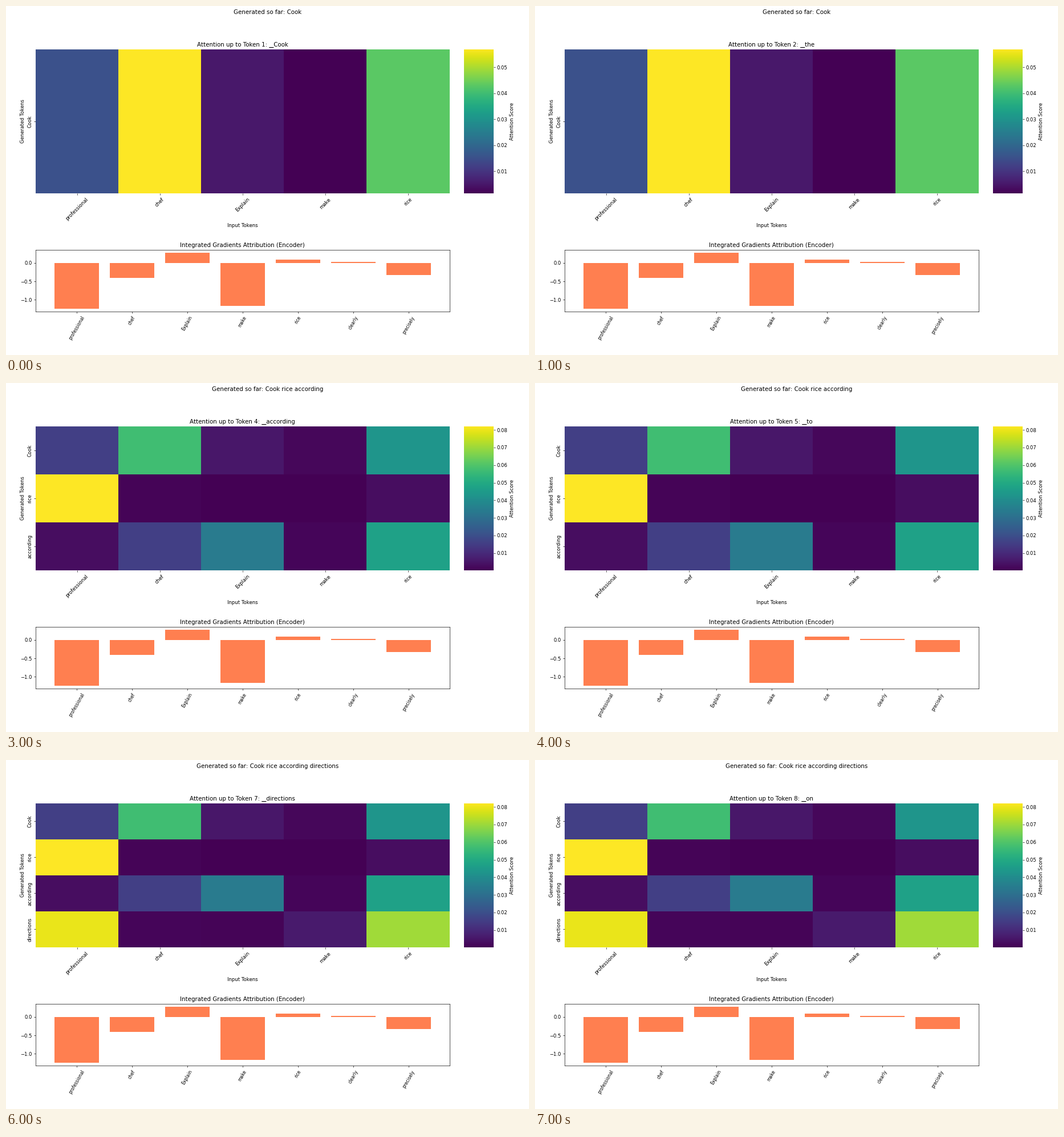
Animation, 917 px wide and 611 px high, one loop 8 s. Source, as a matplotlib script:

```python
import numpy as np
import matplotlib.pyplot as plt
from matplotlib.animation import FuncAnimation
from matplotlib.ticker import MultipleLocator

W, H = 917, 611
DPI = 61.125
plt.rcParams["font.family"] = "DejaVu Sans"

INPUTS = ["professional", "chef", "Explain", "make", "rice"]
TOKENS = ["Cook", "the", "rice", "according", "to", "the", "directions", "on"]
# Attention per content word; filler tokens add no row
SCORES = {
    "Cook": [0.0152, 0.0569, 0.0050, 0.00154, 0.0427],
    "rice": [0.0820, 0.0008, 0.00016, 0.00016, 0.0029],
    "according": [0.0029, 0.0155, 0.0340, 0.0012, 0.0470],
    "directions": [0.0793, 0.0012, 0.0008, 0.0056, 0.0702],
}
GRADIENTS = [-1.247, -0.404, 0.266, -1.165, 0.085, 0.02, -0.335]

fig = plt.figure(figsize=((W + 0.01) / DPI, (H + 0.01) / DPI), dpi=DPI)


def add_axes(left, top, right, bottom):
    """Axes placed by pixel edges, measured from the top left."""
    return fig.add_axes([left / W, 1 - bottom / H,
                         (right - left) / W, (bottom - top) / H])


heat_ax = add_axes(52, 76, 777.6, 328)
scale_ax = add_axes(803, 76, 854.5, 328)
bar_ax = add_axes(52, 427.5, 777.6, 535.3)
headline = fig.suptitle("", y=0.99, fontsize=12)


def draw_bars():
    labels = INPUTS + ["clearly", "precisely"]
    bar_ax.bar(range(len(labels)), GRADIENTS, color="coral")
    bar_ax.set_xticks(range(len(labels)), labels, rotation=60, fontsize=9)
    bar_ax.yaxis.set_major_locator(MultipleLocator(0.5))
    bar_ax.set_title("Integrated Gradients Attribution (Encoder)")


def draw_heat(words, title):
    data = np.array([SCORES[w] for w in words])
    heat_ax.clear()
    heat_ax.pcolormesh(data, cmap="viridis")
    heat_ax.set(xlim=(0, len(INPUTS)), ylim=(len(words), 0), title=title,
                xlabel="Input Tokens", ylabel="Generated Tokens")
    heat_ax.set_xticks(np.arange(len(INPUTS)) + 0.5, INPUTS, rotation=45)
    heat_ax.set_yticks(np.arange(len(words)) + 0.5, words, rotation=90,
                       va="center")
    heat_ax.spines[:].set_visible(False)
    return data.min(), data.max()


def draw_scale(low, high):
    scale_ax.clear()
    ramp = np.linspace(0, 1, 256)[:, None]
    scale_ax.imshow(ramp, cmap="viridis", aspect="auto", origin="lower",
                    extent=(0, 1, low, high))
    scale_ax.set_xticks([])
    scale_ax.yaxis.tick_right()
    scale_ax.yaxis.set_label_position("right")
    scale_ax.yaxis.set_major_locator(MultipleLocator(0.01))
    scale_ax.yaxis.set_major_formatter("{x:.2f}")
    scale_ax.set_ylabel("Attention Score")
    scale_ax.spines[:].set_visible(False)


def update(step):
    words = [t for t in TOKENS[:step + 1] if t in SCORES]
    title = f"Attention up to Token {step + 1}: \u2581{TOKENS[step]}"
    draw_scale(*draw_heat(words, title))
    headline.set_text("Generated so far: " + " ".join(words))
    return []


draw_bars()
anim = FuncAnimation(fig, update, frames=len(TOKENS), interval=1000,
                     init_func=lambda: update(0), repeat=True,
                     repeat_delay=0, blit=False)
plt.show()
```
